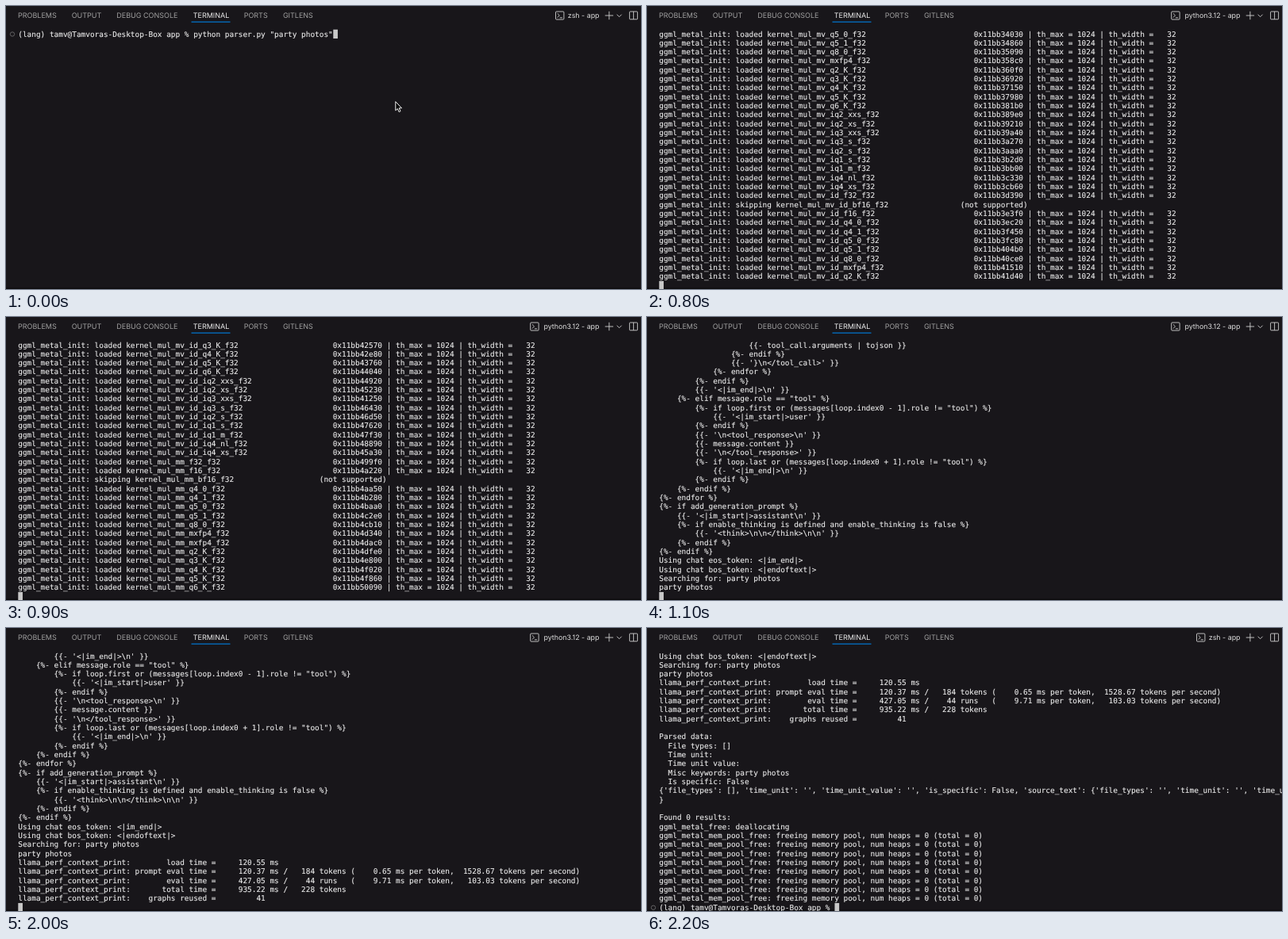
Write an HTML page that moves like this. It is 800 px wide and 357 px high and loops after 3000 ms.

```html
<!DOCTYPE html>
<html lang="en">
<head>
<meta charset="utf-8">
<title>Terminal</title>
<style>
  html, body { margin: 0; height: 100%; overflow: hidden; background: #18161a; }
  svg { display: block; width: 800px; height: 357px; overflow: hidden; }
  text { white-space: pre; text-rendering: geometricPrecision; font-variant-ligatures: none; }
  .mono { font: 9.42px "DejaVu Sans Mono", monospace; fill: #ececec; stroke: #ececec; stroke-width: .12; }
  .ui { font: 9px Inter, sans-serif; fill: #a0a0a0; }
  .ui.on { fill: #ededed; }
  .ui.title { font-size: 8.9px; fill: #dedede; text-anchor: end; }
  .icon { fill: none; stroke: #d0d0d0; stroke-width: .9; }
</style>
</head>
<body>
<svg id="stage" viewBox="0 0 800 357">
  <rect width="800" height="357" fill="#18161a"/>
  <rect y="355.6" width="800" height="1.4" fill="#0b0a0c"/>
  <rect x="233.5" y="19.5" width="49" height="1.2" fill="#0078d4"/>
  <g class="icon">
    <path d="M754.7 12h10.4M759.9 6.8v10.4"/>
    <path d="M769.6 10.7l3 3 3-3"/>
    <rect x="785.6" y="7" width="10" height="9.8" rx=".8"/>
    <path d="M790.6 7v9.8"/>
  </g>
</svg>
<script>
const LOOP = 3000, ROWS = 28;
const X0 = 15.3, TOP = 29.7, COL = 5.671, ROW = 11.33;
const stage = document.getElementById("stage");

function add(parent, tag, attrs, text) {
  const el = document.createElementNS("http://www.w3.org/2000/svg", tag);
  for (const k in attrs) el.setAttribute(k, attrs[k]);
  if (text) el.textContent = text;
  return parent.appendChild(el);
}

const tabs = [["PROBLEMS", 15], ["OUTPUT", 82.7], ["DEBUG CONSOLE", 139.3],
  ["TERMINAL", 235.7], ["PORTS", 299.7], ["GITLENS", 348.9]];
for (const [name, x] of tabs)
  add(stage, "text", { x, y: 14.8, class: name === "TERMINAL" ? "ui on" : "ui" }, name);

// Kernel log: the same type list repeats for each operation
const words = s => s.split(" ");
const QUANTS = words("q4_0 q4_1 q5_0 q5_1 q8_0 mxfp4");
const K_QUANTS = words("q2_K q3_K q4_K q5_K q6_K");
const I_QUANTS = words("iq2_xxs iq2_xs iq3_xxs iq3_s iq2_s iq1_s iq1_m iq4_nl iq4_xs");
const ADDRESSES = words("42570 42e80 43760 44040 44920 45230 41250 46430 46d50 47620 47f30 " +
  "48890 45a30 499f0 4a220 - 4aa50 4b280 4baa0 4c2e0 4cb10 4d340 4dac0 4dfe0 4e800 4f020 4f860 50090");

const kernels = [];
for (const op of ["mv", "mv_id", "mm", "mm_id"]) {
  const floats = op.startsWith("mm") ? ["f32", "f16", "bf16"] : ["f32", "bf16", "f16"];
  const extra = op.startsWith("mm") ? ["mxfp4"] : [];
  for (const q of [...floats, ...QUANTS, ...extra, ...K_QUANTS, ...I_QUANTS])
    kernels.push(`kernel_mul_${op}_${q}_f32`);
}
const first = kernels.indexOf("kernel_mul_mv_id_q3_K_f32");

function kernelLine(name, i) {
  const label = name.padEnd(40);
  if (name.includes("bf16")) return `ggml_metal_init: skipping ${label} (not supported)`;
  const n = i - first;
  const tail = ADDRESSES[n] || (0x42570 + n * 0x830).toString(16);
  return `ggml_metal_init: loaded ${label} ${("0x11bb" + tail).padStart(16)} | th_max = 1024 | th_width =   32`;
}
const kernelLog = kernels.map(kernelLine);
const kernelPage = start => kernelLog.slice(start, start + ROWS);

const log = String.raw`
                    {{- tool_call.arguments | tojson }}
                {%- endif %}
                {{- '}\n</tool_call>' }}
            {%- endfor %}
        {%- endif %}
        {{- '<|im_end|>\n' }}
    {%- elif message.role == "tool" %}
        {%- if loop.first or (messages[loop.index0 - 1].role != "tool") %}
            {{- '<|im_start|>user' }}
        {%- endif %}
        {{- '\n<tool_response>\n' }}
        {{- message.content }}
        {{- '\n</tool_response>' }}
        {%- if loop.last or (messages[loop.index0 + 1].role != "tool") %}
            {{- '<|im_end|>\n' }}
        {%- endif %}
    {%- endif %}
{%- endfor %}
{%- if add_generation_prompt %}
    {{- '<|im_start|>assistant\n' }}
    {%- if enable_thinking is defined and enable_thinking is false %}
        {{- '<think>\n\n</think>\n\n' }}
    {%- endif %}
{%- endif %}
Using chat eos_token: <|im_end|>
Using chat bos_token: <|endoftext|>
Searching for: party photos
party photos
llama_perf_context_print:        load time =     120.55 ms
llama_perf_context_print: prompt eval time =     120.37 ms /   184 tokens (    0.65 ms per token,  1528.67 tokens per second)
llama_perf_context_print:        eval time =     427.05 ms /    44 runs   (    9.71 ms per token,   103.03 tokens per second)
llama_perf_context_print:       total time =     935.22 ms /   228 tokens
llama_perf_context_print:    graphs reused =         41

Parsed data:
  File types: []
  Time unit:
  Time unit value:
  Misc keywords: party photos
  Is specific: False
{'file_types': [], 'time_unit': '', 'time_unit_value': '', 'is_specific': False, 'source_text': {'file_types': '', 'time_unit': '', 'time_unit_value': ''
}

Found 0 results:
ggml_metal_free: deallocating`.slice(1).split("\n");
for (let i = 0; i < 8; i++)
  log.push("ggml_metal_mem_pool_free: freeing memory pool, num heaps = 0 (total = 0)");
const logPage = start => log.slice(start, start + ROWS);

const prompt = "(lang) tamv@Tamvoras-Desktop-Box app % ";
const command = prompt + 'python parser.py "party photos"';

// Each step: start time, lines (the cursor ends the last one), prompt row, pointer
const steps = [
  { at: 0, lines: [command], mark: 0, pointer: true },
  { at: 600, lines: [command, ""], mark: 0 },
  { at: 800, lines: [...kernelPage(first - ROWS), ""] },
  { at: 900, lines: [...kernelPage(first), ""] },
  { at: 1000, lines: [...kernelPage(first + ROWS), ""] },
  { at: 1100, lines: [...logPage(0), ""] },
  { at: 2000, lines: [...logPage(5), ""] },
  { at: 2100, lines: [...logPage(25), ""] },
  { at: 2200, lines: [...logPage(25), prompt], mark: ROWS }
];

function drawTitle(g, idle) {
  const x = idle ? 692.5 : 660.7;
  add(g, "rect", { x, y: 7, width: 10.4, height: 10, rx: 1, class: "icon" });
  add(g, "path", { d: `M${x + 2.2} 9.3l2.6 2.6-2.6 2.6M${x + 5.2} 14.8h3.2`, class: "icon" });
  add(g, "text", { x: 747.5, y: 15, class: "ui title" }, idle ? "zsh - app" : "python3.12 - app");
}

function drawStep({ lines, mark, pointer }) {
  const g = add(stage, "g", { opacity: 0 });
  drawTitle(g, mark !== undefined);
  lines.forEach((line, i) => {
    if (line) add(g, "text", { x: X0, y: TOP + 8.8 + i * ROW, class: "mono" }, line);
  });
  const last = lines.length - 1;
  add(g, "rect", { x: X0 + lines[last].length * COL, y: TOP + last * ROW,
    width: COL, height: ROW, fill: "#c8c8c8" });
  if (mark !== undefined)
    add(g, "circle", { cx: 8, cy: TOP + 5.8 + mark * ROW, r: 2.7, fill: "none", stroke: "#626163" });
  if (pointer)
    add(g, "path", { d: "M490.8 120.6v11.2l2.5-2.3 1.8 4.1 1.9-.9-1.8-3.9h3.3z",
      fill: "#050505", stroke: "#f4f4f4", "stroke-width": 1, "stroke-linejoin": "round" });
  return g;
}

steps.forEach((step, i) => {
  const end = i + 1 < steps.length ? steps[i + 1].at : LOOP;
  const key = (time, opacity) => ({ offset: time / LOOP, opacity, easing: "step-end" });
  const keys = [key(step.at, 1), key(end, 0)];
  if (step.at > 0) keys.unshift(key(0, 0));
  if (end < LOOP) keys.push(key(LOOP, 0));
  const anim = drawStep(step).animate(keys, { duration: LOOP, iterations: Infinity });
  anim.startTime = 0;
});
</script>
</body>
</html>
```
